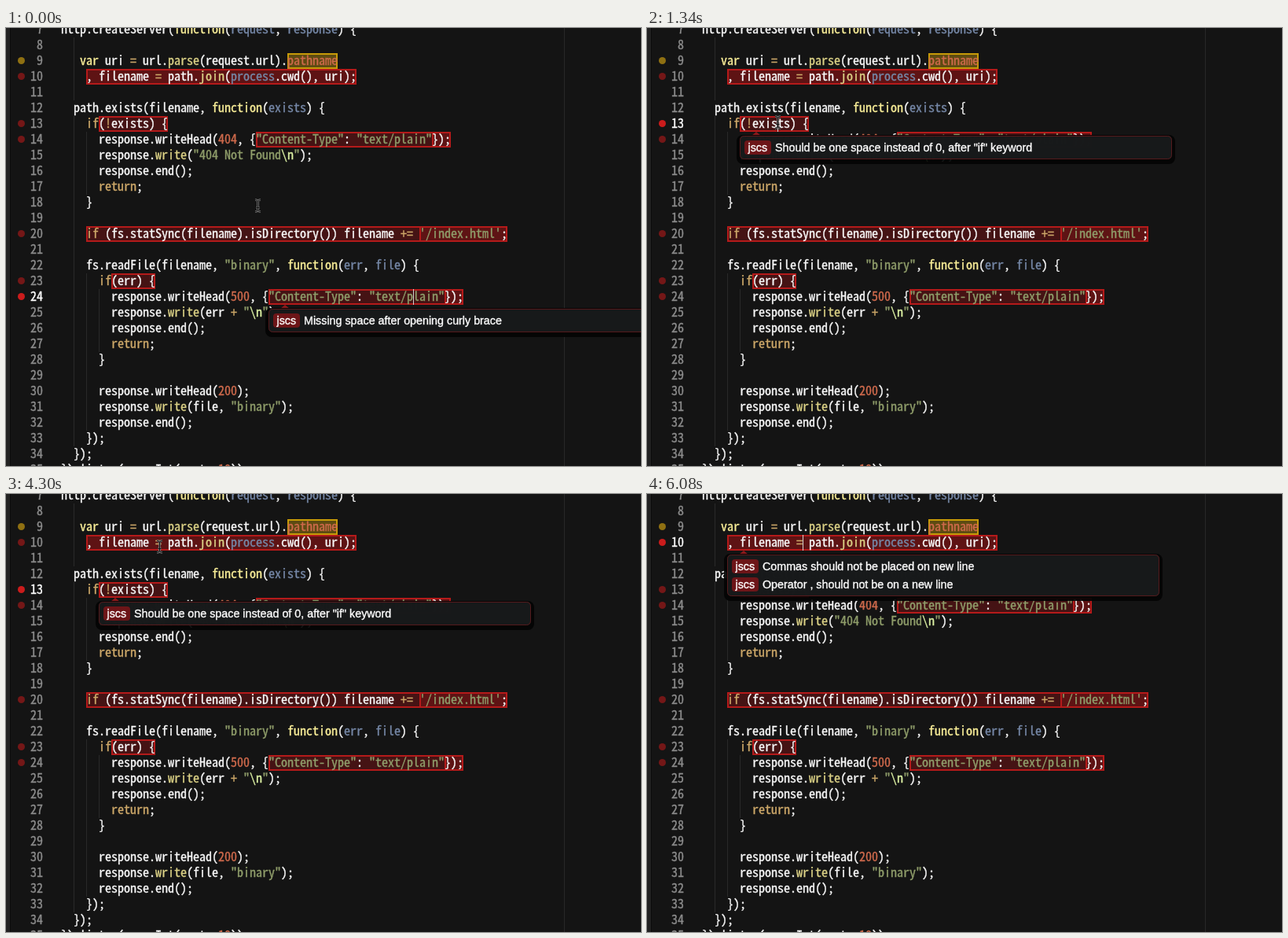
Recreate the animation shown at these times as an HTML page with a canvas. Size 808 by 557 pixels, loop 6200 ms.

```html
<!DOCTYPE html>
<html lang="en">
<head>
<meta charset="utf-8">
<title>Lint tooltips</title>
<style>
  html, body { margin: 0; width: 100%; height: 100%; overflow: hidden; background: #141414; }
  canvas { display: block; }
</style>
</head>
<body>
<canvas id="stage" width="808" height="557"></canvas>
<script>
const ctx = document.getElementById('stage').getContext('2d');
const LOOP = 6200, STEP = 148.3, BLINK = 400;
const CHAR = 8, LEFT = 70, FIRST = 7;
const rowY = n => 42 + (n - 9) * 20;

const code = String.raw`http.createServer(function(request, response) {

   var uri = url.parse(request.url).pathname
    , filename = path.join(process.cwd(), uri);

  path.exists(filename, function(exists) {
    if(!exists) {
      response.writeHead(404, {"Content-Type": "text/plain"});
      response.write("404 Not Found\n");
      response.end();
      return;
    }

    if (fs.statSync(filename).isDirectory()) filename += '/index.html';

    fs.readFile(filename, "binary", function(err, file) {
      if(err) {
        response.writeHead(500, {"Content-Type": "text/plain"});
        response.write(err + "\n");
        response.end();
        return;
      }

      response.writeHead(200);
      response.write(file, "binary");
      response.end();
    });
  });
}).listen(parseInt(port, 10));`.split('\n');

const rules = [
  [/"[^"]*"|'[^']*'/, '#8f9d6a'],
  [/\b(?:function|var)\b/, '#f9ee98'],
  [/\b(?:if|return)\b|\+=|[=+!]/, '#cda869'],
  [/(?<=function\([^)]*)\w+|\bprocess\b/, '#7587a6'],
  [/(?<=\.)(?:write|parse|join)\b/, '#dad085'],
  [/\b\d+\b|\bpathname\b/, '#cf6a4c']
];
const lexer = new RegExp(rules.map(r => `(${r[0].source})`).join('|'), 'g');

// line, first x, last x, has a second message on the same span
const marks = [
  [10, 102, 446, 1], [13, 118, 206], [14, 318, 566], [14, 542, 566, 1],
  [20, 102, 638], [20, 526, 638, 1], [23, 134, 190], [24, 334, 582], [24, 558, 582, 1]
];
const errorRows = [10, 13, 14, 20, 23, 24];

const tips = {
  10: { x: 102, y: 77, text: ['Commas should not be placed on new line', 'Operator , should not be on a new line'] },
  13: { x: 118, y: 137, text: ['Should be one space instead of 0, after "if" keyword'] },
  24: { x: 334, y: 357, text: ['Missing space after opening curly brace'] }
};

// time of the click, line, caret x
const clicks = [[0, 24, 518], [280, 18, 110], [1330, 13, 166], [4440, 10, 198]];

const path = [
  [0, 320, 226], [440, 306, 213], [600, 306, 213], [890, 258, 178], [1190, 168, 122],
  [1340, 166, 120], [2100, 166, 120], [2520, 219, 51], [2670, 224, 47], [2820, 228, 46],
  [3260, 205, 68], [3550, 195, 67], [4440, 195, 67], [4890, 310, 250],
  [5200, 310, 250], [5640, 560, 400], [5930, 778, 550], [6060, 800, 580]
];

// Half-width Latin face when present, otherwise the plain monospace one
ctx.font = '16px "Noto Sans Mono CJK JP", monospace';
const narrow = Math.abs(ctx.measureText('Mi').width - 2 * CHAR) < 0.1;
const mono = narrow ? '16px "Noto Sans Mono CJK JP", monospace'
                    : '13.333px "Noto Sans Mono", "Liberation Mono", monospace';
const sans = '14.3px "Liberation Sans", Arial, sans-serif';

function rect(x, y, w, h, color) {
  ctx.fillStyle = color;
  ctx.fillRect(x, y, w, h);
}

function round(x, y, w, h, r, color) {
  ctx.fillStyle = color;
  ctx.beginPath();
  ctx.roundRect(x, y, w, h, r);
  ctx.fill();
}

// The thin outline gives the heavier look of smoothed type
function write(text, x, y, color) {
  ctx.fillStyle = ctx.strokeStyle = color;
  ctx.lineWidth = 0.35;
  ctx.fillText(text, x, y);
  ctx.strokeText(text, x, y);
}

function drawLine(text, y) {
  const put = (s, at, color) => write(s, LEFT + at * CHAR, y, color);
  let at = 0;
  for (const m of text.matchAll(lexer)) {
    put(text.slice(at, m.index), at, '#f8f8f8');
    at = m.index;
    const color = rules[m.slice(1).findIndex(g => g !== undefined)][1];
    for (const part of m[0].split(/(\\n)/)) {
      put(part, at, part === '\\n' ? '#ddf2a4' : color);
      at += part.length;
    }
  }
  put(text.slice(at), at, '#f8f8f8');
}

function drawMark(row, x1, x2, fill, edge) {
  const y = rowY(row) - 10;
  rect(x1, y, x2 - x1, 20, fill);
  ctx.strokeStyle = edge;
  ctx.lineWidth = 2;
  ctx.strokeRect(x1 + 1, y + 1, x2 - x1 - 2, 18);
}

function drawGuides() {
  for (let i = 0; i < code.length; i++) {
    const row = FIRST + i;
    let indent = code[i].search(/\S/);
    if (indent < 0) indent = row < 12 ? 3 : row === 29 ? 6 : 4;
    for (let col = 2; col < indent; col += 2)
      rect(LEFT + col * CHAR, rowY(row) - 10, 1, 20, '#292929');
  }
}

function drawEditor(active) {
  rect(0, 0, 808, 557, '#141414');
  rect(0, 0, 5, 557, '#222');
  rect(5, 0, 1, 557, '#0b0b0b');
  rect(710, 0, 1, 557, '#282828');
  drawGuides();
  drawMark(9, 358, 422, '#5e4b12', '#c79a08');
  for (const [row, a, b, strong] of marks)
    drawMark(row, a, b, strong ? '#5e1314' : '#451314', '#b51a1a');
  ctx.font = mono;
  code.forEach((text, i) => {
    const row = FIRST + i, y = rowY(row) + 5;
    drawLine(text, y);
    ctx.textAlign = 'right';
    write(row, 47, y, row === active ? '#fff' : '#8c8c8c');
    ctx.textAlign = 'left';
  });
  const dot = (row, color) => round(15, rowY(row) - 5, 9, 9, 4.5, color);
  dot(9, '#8f7012');
  errorRows.forEach(row => dot(row, row === active ? '#cb1c1c' : '#741717'));
}

function drawTip({ x, y, text }) {
  const w = 550, h = 7 + 23 * text.length;
  ctx.fillStyle = '#8c1a1c';
  ctx.beginPath();
  ctx.moveTo(x + 15, y);
  ctx.lineTo(x + 21, y - 5);
  ctx.lineTo(x + 27, y);
  ctx.fill();
  round(x - 4, y - 1, w + 8, h + 7, 8, 'rgba(4,4,4,.92)');
  round(x, y, w, h, 5, 'rgba(25,27,28,.95)');
  ctx.strokeStyle = '#551a1c';
  ctx.lineWidth = 1;
  ctx.beginPath();
  ctx.roundRect(x + 0.5, y + 0.5, w - 1, h - 1, 5);
  ctx.stroke();
  ctx.font = sans;
  text.forEach((line, i) => {
    const base = y + 20 + 23 * i;
    round(x + 6, base - 14, 34, 18, 4, '#6d1518');
    write('jscs', x + 10.5, base, '#fff');
    write(line, x + 45, base, '#fff');
  });
}

function drawPointer(t) {
  const i = path.findLastIndex(p => p[0] <= t);
  const a = path[i], b = path[i + 1] || a;
  const f = a === b ? 0 : (t - a[0]) / (b[0] - a[0]);
  const x = Math.round(a[1] + (b[1] - a[1]) * f) + 0.5;
  const y = Math.round(a[2] + (b[2] - a[2]) * f);
  for (const [width, color] of [[2.6, '#7c7c7c'], [1, '#111']]) {
    ctx.strokeStyle = color;
    ctx.lineWidth = width;
    ctx.beginPath();
    for (const s of [-1, 1]) {
      ctx.moveTo(x - 3.5, y + 7.5 * s);
      ctx.quadraticCurveTo(x, y + 7.5 * s, x, y + 5 * s);
      ctx.quadraticCurveTo(x, y + 7.5 * s, x + 3.5, y + 7.5 * s);
    }
    ctx.moveTo(x, y - 6);
    ctx.lineTo(x, y + 6);
    ctx.moveTo(x - 2, y + 2.5);
    ctx.lineTo(x + 2, y + 2.5);
    ctx.stroke();
  }
}

function draw(now) {
  const t = Math.floor((now % LOOP + 10) / STEP) * STEP;
  const [since, row, caretX] = clicks.findLast(c => c[0] <= t + 10);
  drawEditor(row);
  if (row === 18) {
    for (let x = 103; x < 110; x += 2) rect(x, 231, 1, 1, '#aaa');
  }
  if (Math.floor(Math.max(0, t - since) / BLINK) % 2 === 0)
    rect(caretX, rowY(row) - 10, 1, 20, '#d0d0d0');
  if (tips[row]) drawTip(tips[row]);
  drawPointer(t);
  requestAnimationFrame(draw);
}
requestAnimationFrame(draw);
</script>
</body>
</html>
```
